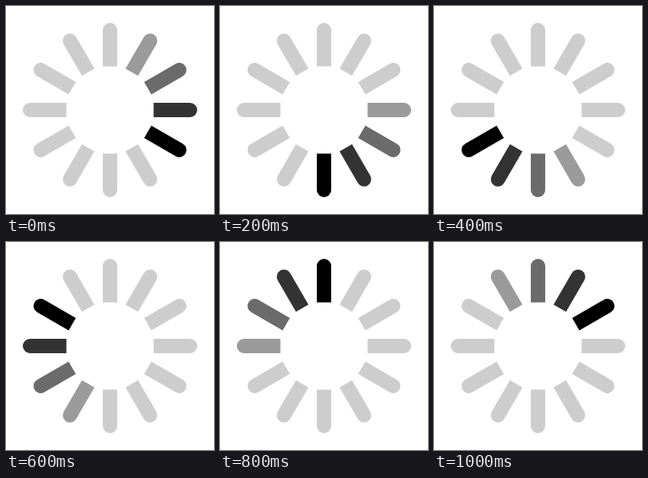
Write an HTML page with a canvas that moves like this. It is 260 by 260 pixels and loops after 1.2 s.

```html
<!DOCTYPE html>
<html lang="en">
<head>
<meta charset="utf-8">
<title>Loading</title>
<style>
  html, body { margin: 0; width: 100%; height: 100%; overflow: hidden; background: #fff; }
  canvas { display: block; width: 260px; height: 260px; }
</style>
</head>
<body>
<canvas id="stage" width="260" height="260"></canvas>
<script>
const ctx = document.getElementById('stage').getContext('2d');
const SIZE = 260, BARS = 12, LOOP = 1200, STEP = 100;
const FIRST = 4, LAST_STEP = 10;
const INNER = 54.5, OUTER = 109, HALF = 9;
const TRAIL = ['#000', '#333', '#6b6b6b', '#9b9b9b'];
const IDLE = '#cdcdcd';

function drawBar(index, color) {
  ctx.save();
  ctx.translate(SIZE / 2, SIZE / 2);
  ctx.rotate(index * 2 * Math.PI / BARS);
  ctx.beginPath();
  ctx.moveTo(-HALF, -INNER);
  ctx.arc(0, HALF - OUTER, HALF, Math.PI, 0);
  ctx.lineTo(HALF, -INNER);
  ctx.closePath();
  ctx.fillStyle = color;
  ctx.fill();
  ctx.restore();
}

function draw(time) {
  // The last position is held for two steps before the loop restarts.
  const step = Math.min(Math.floor((time % LOOP) / STEP), LAST_STEP);
  const head = FIRST + step;
  ctx.fillStyle = '#fff';
  ctx.fillRect(0, 0, SIZE, SIZE);
  for (let i = 0; i < BARS; i++) {
    const age = (head - i + BARS) % BARS;
    drawBar(i, TRAIL[age] || IDLE);
  }
}

const start = performance.now();
function tick() {
  draw(performance.now() - start);
  requestAnimationFrame(tick);
}
tick();
</script>
</body>
</html>
```
